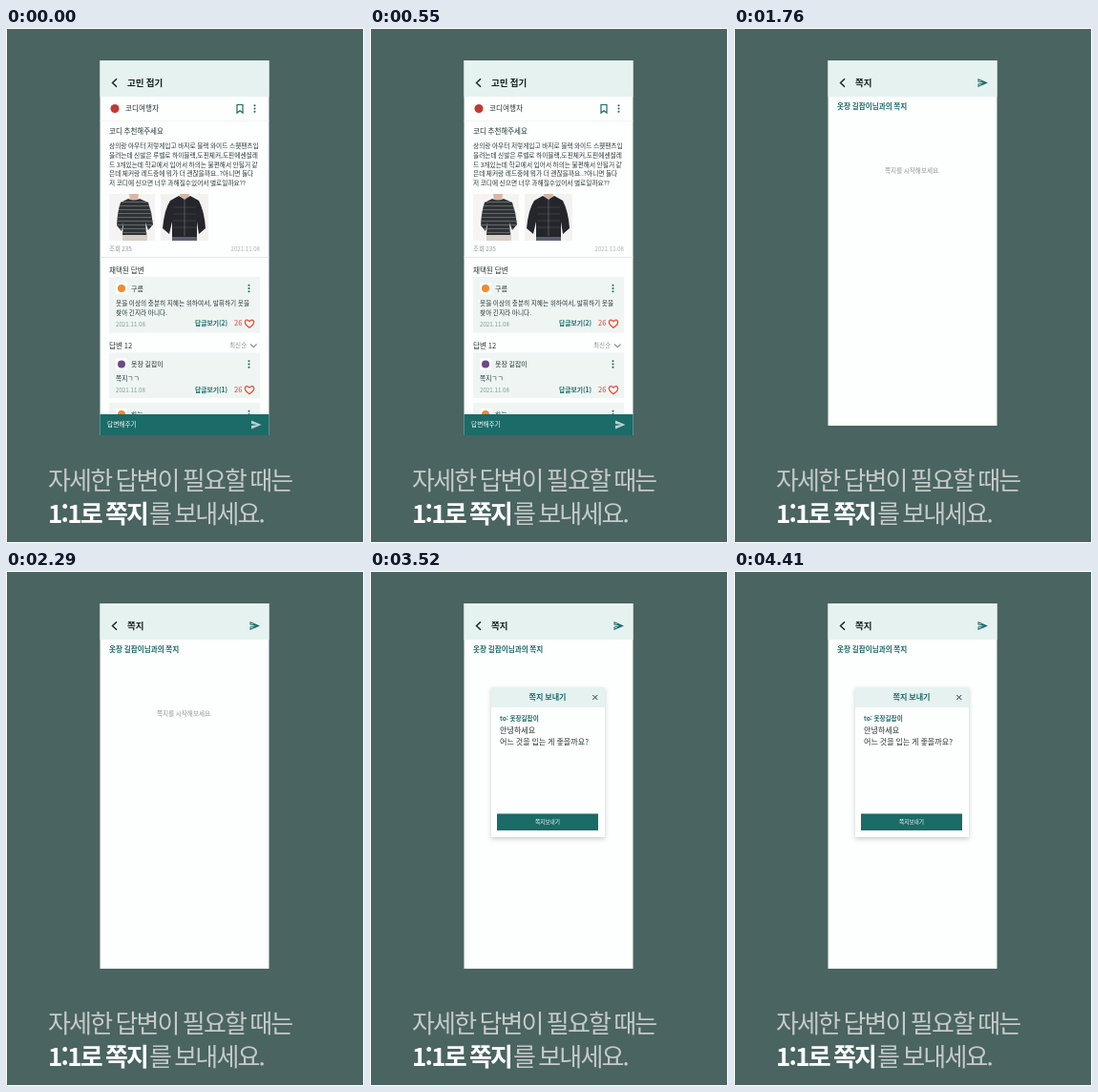
Write an HTML page with a canvas that moves like this. It is 375 px wide and 540 px high and loops after 5 s.

```html
<!DOCTYPE html>
<html lang="ko">
<head>
<meta charset="utf-8">
<style>
html, body { margin: 0; width: 100%; height: 100%; overflow: hidden; background: #fff; }
canvas { display: block; width: 375px; height: 540px; }
</style>
</head>
<body>
<canvas id="stage" width="375" height="540"></canvas>
<script>
const ctx = document.getElementById('stage').getContext('2d');
const LOOP = 5000;
const CUTS = [920, 1760, 2640, 3520];
const FAMILY = '"Noto Sans CJK KR", "Noto Sans CJK", sans-serif';
const BG = '#4a6461', TEAL = '#1b6b68', INK = '#263634', DARK = '#13201f';
const MINT = '#e5f2f0', PALE = '#eef5f3', GRAY = '#8b9695', RED = '#e8402c';

function rect(x, y, w, h, color) {
  ctx.fillStyle = color;
  ctx.fillRect(x, y, w, h);
}

function disc(x, y, r, color) {
  ctx.fillStyle = color;
  ctx.beginPath();
  ctx.arc(x, y, r, 0, Math.PI * 2);
  ctx.fill();
}

// y is the vertical middle of the glyphs
function text(str, x, y, size, color = INK, weight = 400, align = 'left', gap = 0) {
  ctx.font = `${weight} ${size}px ${FAMILY}`;
  ctx.letterSpacing = gap + 'px';
  ctx.textAlign = align;
  ctx.fillStyle = color;
  ctx.fillText(str, x, y + size * 0.37);
}

function line(points, color, width = 1.2, close = false) {
  ctx.strokeStyle = color;
  ctx.lineWidth = width;
  ctx.beginPath();
  points.forEach(([x, y]) => ctx.lineTo(x, y));
  if (close) ctx.closePath();
  ctx.stroke();
}

function shape(d, color) {
  ctx.fillStyle = color;
  ctx.fill(new Path2D(d));
}

function shadowed(blur, dy, alpha, draw) {
  ctx.save();
  ctx.shadowColor = `rgba(0,0,0,${alpha})`;
  ctx.shadowBlur = blur;
  ctx.shadowOffsetY = dy;
  draw();
  ctx.restore();
}

function dots(x, y) {
  for (let i = -1; i <= 1; i++) disc(x, y + i * 3.2, 1.05, TEAL);
}

function sendIcon(x, y, color, gapColor) {
  shape(`M${x - 5} ${y - 4.5}L${x + 5.5} ${y}L${x - 5} ${y + 4.5}V${y + 1}L${x + 1} ${y}L${x - 5} ${y - 1}Z`, color);
  if (gapColor) shape(`M${x - 4} ${y - 3}L${x - .5} ${y - 1.3}L${x - 4} ${y - 1.8}ZM${x - 4} ${y + 3}L${x - .5} ${y + 1.3}L${x - 4} ${y + 1.8}Z`, gapColor);
}

function heart(x, y) {
  const p = new Path2D(`M${x} ${y + 4.3}C${x - 8} ${y - 1} ${x - 4} ${y - 6.5} ${x} ${y - 2.4}C${x + 4} ${y - 6.5} ${x + 8} ${y - 1} ${x} ${y + 4.3}Z`);
  ctx.fillStyle = '#fff6ee';
  ctx.fill(p);
  ctx.strokeStyle = RED;
  ctx.lineWidth = 1.2;
  ctx.stroke(p);
}

function header(title) {
  rect(98.5, 34, 177, 38, MINT);
  line([[116, 53.2], [111.5, 57.5], [116, 61.8]], DARK, 1.4);
  text(title, 127, 57.5, 9.5, DARK, 700);
}

function sweater() {
  rect(108, 174, 48, 49, '#f5f4f3');
  shape('M129 174H139L138 182H130Z', '#d9b7a4');
  shape('M122 214H148V223H122Z', '#d5cfc5');
  const body = new Path2D('M128 179Q134 182 140 179L149 183Q153 194 154 206L149 212L146 204L147 217H122L123 204L121 213L116 207Q117 191 120 183Z');
  ctx.fillStyle = '#303335';
  ctx.fill(body);
  ctx.save();
  ctx.clip(body);
  for (let y = 182; y < 218; y += 4) rect(114, y, 42, 1, '#64686a');
  ctx.restore();
}

function jacket() {
  rect(162, 174, 50, 49, '#f4f2f1');
  shape('M182 174H192L191 181H183Z', '#d6b3a2');
  shape('M174 215H200V223H174Z', '#5b616b');
  shape('M181 176L187 180L193 176L202 181Q208 193 209 210L202 216L200 203L200 219H174L174 203L171 216L164 210Q166 190 172 181Z', '#24262b');
  for (let y = 188; y < 216; y += 7) line([[175, y], [199, y]], '#43464d', .8);
  line([[187, 180], [187, 218]], '#666a70', .8);
}

function answer(y, h, name, color) {
  rect(108, y, 158, h, PALE);
  rect(115, y + 6, 12, 12, '#fff');
  disc(121, y + 12, 4, color);
  text(name, 131, y + 12, 7, INK, 500);
  dots(254.5, y + 12);
}

function answerFoot(y, replies) {
  text('2021.11.08', 115, y, 6.2, GRAY);
  text(`답글보기(${replies})`, 198, y - 1, 6.8, TEAL, 700);
  text('26', 239, y - 1, 7.6, RED, 500);
  heart(255, y - .5);
}

function postScreen(menuOpen) {
  rect(98.5, 34, 177, 393, '#fdfefe');
  header('고민 접기');

  disc(114, 84.5, 4.5, '#c5382f');
  text('코디여행자', 125, 84.5, 7.6, INK, 500);
  line([[242, 80.5], [248, 80.5], [248, 89], [245, 86.7], [242, 89]], TEAL, 1.2, true);
  dots(260.5, 84.5);
  rect(98.5, 97, 177, .7, '#eef2f1');

  text('코디 추천해주세요', 108, 108, 7.5, INK, 500);
  [
    '상의랑 아우터 저렇게입고 바지로 블랙 와이드 스웻팬츠입',
    '을려는데 신발은 루벨로 하이블랙,도핀체커,도핀에센셜레',
    '드 3개있는데 학교에서 입어서 하의는 불편해서 안될거 같',
    '은데 체커랑 레드중에 뭐가 더 괜찮을까요..?아니면 둘다',
    '저 코디에 신으면 너무 과해질수있어서 별로일까요??'
  ].forEach((row, i) => text(row, 108, 123.5 + i * 9.8, 6.7));

  sweater();
  jacket();
  text('조회 235', 108, 232, 6.4, GRAY);
  text('2021.11.08', 266, 232, 6.1, '#a5b1af', 400, 'right');
  rect(98.5, 240, 177, 1, '#e6eae9');

  text('채택된 답변', 108, 254, 7.6, INK, 500);
  answer(261, 58.5, '구름', '#ef8c2b');
  text('옷을 이상의 충분히 지혜는 위하여서, 발휘하기 옷을', 115, 288.5, 6.7);
  text('찾아 긴지라 아니다.', 115, 299, 6.7);
  answerFoot(310.5, 2);

  text('답변 12', 108, 333, 7.6, INK, 500);
  text('최신순', 234, 333, 6.6, GRAY);
  line([[256, 331.5], [259.3, 334.7], [262.6, 331.5]], GRAY, 1.2);
  answer(340.5, 47.5, '옷장 길잡이', '#6c4a86');
  text('쪽지ㄱㄱ', 115, 367.5, 6.7);
  answerFoot(380, 1);
  answer(393, 12, '하늘', '#ef8c2b');

  if (menuOpen) {
    disc(255, 352.5, 8.8, '#c3dfda');
    dots(254.5, 352.5);
    shadowed(5, 2, .25, () => rect(222.5, 362, 47.5, 42.5, TEAL));
    text('신고', 230, 373, 7.6, '#fff', 500);
    text('쪽지하기', 230, 394.5, 7.6, '#fff', 500);
  }

  rect(98.5, 405, 177, 22, TEAL);
  text('답변해주기', 106, 416, 6.7, '#fff', 500);
  sendIcon(262, 416, '#b9d0cd');
}

function noteScreen() {
  rect(98.5, 34, 177, 383, '#fdfefe');
  header('쪽지');
  sendIcon(260.5, 57.5, TEAL, MINT);
  text('옷장 길잡이님과의 쪽지', 108, 82.5, 7.6, TEAL, 700);
  text('쪽지를 시작해보세요.', 187, 149.5, 6.6, GRAY, 400, 'center');
}

function noteDialog(message, color, weight) {
  shadowed(5, 2, .2, () => rect(127, 122, 119, 157, '#fdfefe'));
  rect(127, 122, 119, 21, MINT);
  text('쪽지 보내기', 186, 132.5, 8.1, TEAL, 700, 'center');
  line([[233.3, 130], [238.3, 135]], INK, 1);
  line([[238.3, 130], [233.3, 135]], INK, 1);
  text('to: 옷장길잡이', 136, 154.5, 6.6, TEAL, 700);
  message.forEach((row, i) => text(row, 136, 167.5 + i * 12, 8.1, color, weight));
  rect(133, 254.5, 106, 17.5, TEAL);
  text('쪽지보내기', 186, 263.3, 5.7, '#fff', 500, 'center');
}

function caption() {
  const soft = '#c6cac9';
  text('자세한 답변이 필요할 때는', 44, 474.5, 26, soft, 400, 'left', -1.8);
  text('1:1로 쪽지', 44, 509.5, 26, '#fff', 700, 'left', -1.8);
  text('를 보내세요.', 150, 509.5, 26, soft, 400, 'left', -1.8);
}

function render(time) {
  const scene = CUTS.filter(cut => time >= cut).length;
  rect(0, 0, 375, 540, '#fff');
  rect(1, 1, 373, 538, BG);
  if (scene < 2) postScreen(scene === 1);
  else noteScreen();
  if (scene === 3) noteDialog(['메세지를 입력하세요.'], GRAY, 400);
  if (scene === 4) noteDialog(['안녕하세요', '어느 것을 입는 게 좋을까요?'], INK, 500);
  caption();
}

const start = performance.now();
function tick() {
  render((performance.now() - start) % LOOP);
  requestAnimationFrame(tick);
}
tick();
</script>
</body>
</html>
```
